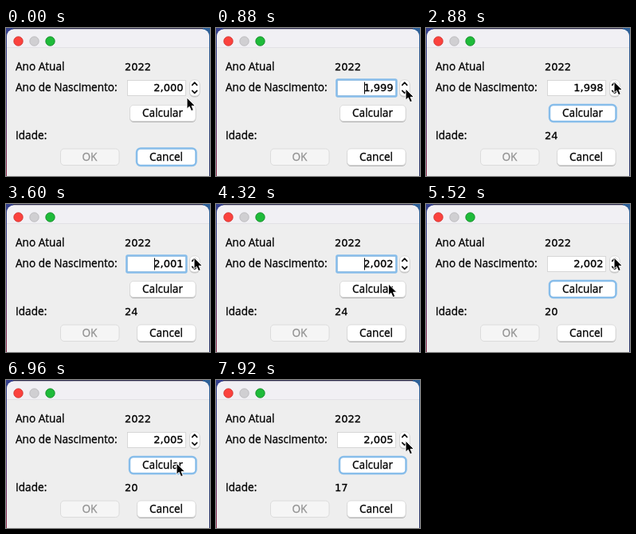
An HTML page that plays this animation: 256x185 px, repeating every 8000 ms.

```html
<!DOCTYPE html>
<html lang="pt">
<head>
<meta charset="utf-8">
<style>
html, body { margin: 0; width: 100%; height: 100%; overflow: hidden; background: #eee; }
svg { display: block; width: 256px; height: 185px; }
text { font: 13.6px "Open Sans", sans-serif; fill: #000; stroke: #000; stroke-width: .3px; }
.num { font: 13px "DejaVu Sans", sans-serif; }
.mid { text-anchor: middle; }
.off { fill: #929292; stroke: #929292; }
.btn { fill: #fff; stroke: #cfcfcf; stroke-width: .6; }
.ring { fill: none; stroke: #87bdea; stroke-width: 2.5; }
.arrow { fill: none; stroke: #111; stroke-width: 1.7; stroke-linecap: round; stroke-linejoin: round; }
</style>
</head>
<body>
<svg viewBox="0 0 256 185">
  <defs>
    <linearGradient id="left" x2="0" y2="1">
      <stop offset="0" stop-color="#34408c"/>
      <stop offset=".5" stop-color="#4a3580"/>
      <stop offset="1" stop-color="#922c50"/>
    </linearGradient>
    <linearGradient id="right" x2="0" y2="1">
      <stop offset="0" stop-color="#2d6098"/>
      <stop offset="1" stop-color="#2c3468"/>
    </linearGradient>
    <filter id="soft" x="-20%" y="-30%" width="140%" height="170%">
      <feDropShadow dx="0" dy=".8" stdDeviation=".7" flood-opacity=".35"/>
    </filter>
    <clipPath id="frame"><rect x="1" y="1.5" width="254" height="195" rx="9"/></clipPath>
  </defs>
  <rect width="128" height="185" fill="url(#left)"/>
  <rect x="128" width="128" height="185" fill="url(#right)"/>
  <rect x="9" width="238" height="2" fill="#292748"/>
  <g clip-path="url(#frame)">
    <rect width="256" height="185" fill="#eee"/>
    <rect width="256" height="24" fill="#f1f0f4"/>
    <path d="M0 24.5H256" stroke="#e2e1e5"/>
  </g>

  <g stroke-width=".9">
    <circle cx="15.5" cy="16.5" r="5.7" fill="#fb423e" stroke="#cf3531"/>
    <circle cx="35.5" cy="16.5" r="5.7" fill="#d0cfd2" stroke="#b9b8bb"/>
    <circle cx="55.5" cy="16.5" r="5.7" fill="#1fbb3a" stroke="#128a28"/>
  </g>

  <text x="12" y="53">Ano Atual</text>
  <text x="149" y="53" class="num">2022</text>
  <text x="12" y="79">Ano de Nascimento:</text>
  <text x="12" y="139">Idade:</text>
  <text id="age" x="149" y="139" class="num"></text>

  <rect x="152.5" y="65.5" width="73" height="19" fill="#fff" stroke="#d0d0d0" stroke-width=".8"/>
  <text id="year" x="222.5" y="79" class="num" text-anchor="end"></text>
  <path id="caret" d="M186.5 67.5V82.5" stroke="#000"/>

  <g filter="url(#soft)">
    <rect class="btn" x="230.5" y="65" width="12.5" height="20" rx="5"/>
    <rect class="btn" x="155.5" y="96.5" width="82.5" height="20" rx="4.5"/>
    <rect class="btn" x="164.5" y="151" width="73.5" height="20.5" rx="4.5"/>
  </g>
  <path class="arrow" d="M233.7 71.3L236.7 68.2L239.7 71.3M233.7 78.3L236.7 81.4L239.7 78.3"/>
  <rect x="68.5" y="151" width="73.5" height="20.5" rx="4.5" fill="#f5f5f5" stroke="#d6d6d6" stroke-width=".8"/>
  <text class="mid" x="196.5" y="110.5">Calcular</text>
  <text class="mid off" x="105" y="165.5">OK</text>
  <text class="mid" x="201" y="165.5">Cancel</text>

  <rect id="fieldRing" class="ring" x="151.4" y="64.4" width="75" height="21" rx="1.5"/>
  <rect id="calcRing" class="ring" x="155" y="96" width="83.5" height="21" rx="5"/>
  <rect id="cancelRing" class="ring" x="164" y="150.5" width="74.5" height="21.5" rx="5"/>

  <path id="pointer" d="M0 0V14.2L3.2 11.3L5.6 16.7L8.3 15.5L6 10.4H10.4Z"
        fill="#000" stroke="#fff" stroke-width="1" stroke-linejoin="round"/>
</svg>
<script>
const LOOP = 8000, STEP = 80, BLINK = 500, NOW = 2022;
const HOME = [227, 87], CALC = [214, 104], UP = [236, 67], DOWN = [238, 76];

// Each round: spin the year a few times, then press Calcular
const rounds = [
  { spin: 480, gap: 480, clicks: 2, dir: -1, press: 1920 },
  { spin: 3120, gap: 240, clicks: 4, dir: 1, press: 4640 },
  { spin: 5600, gap: 240, clicks: 3, dir: 1, press: 6960 },
];
const spot = r => r.dir > 0 ? UP : DOWN;

// Lists of [time, value], each value held until the next
const years = [[0, 2000]], ages = [[0, ""]], focus = [[0, "cancel"]];
const moves = [{ t: 80, span: 320, to: spot(rounds[0]) }];

let year = 2000;
rounds.forEach((r, i) => {
  for (let k = 0; k < r.clicks; k++) years.push([r.spin + k * r.gap, year += r.dir]);
  focus.push([r.spin, "field"], [r.press, "calc"]);
  ages.push([r.press + 160, NOW - year]);
  moves.push(
    { t: r.press - 640, span: 480, to: CALC },
    { t: r.press + 320, span: 320, to: spot(rounds[(i + 1) % rounds.length]) });
});

const el = id => document.getElementById(id);
const at = (list, t) => list.filter(e => e[0] <= t).pop();
const easeOut = u => 1 - (1 - u) ** 2;

function pointerAt(t) {
  let p = HOME;
  for (const m of moves) {
    const u = easeOut(Math.min(1, Math.max(0, (t - m.t) / m.span)));
    p = p.map((v, i) => v + (m.to[i] - v) * u);
  }
  return p;
}

function show(id, on) {
  el(id).setAttribute("visibility", on ? "visible" : "hidden");
}

function draw(ms) {
  const t = Math.floor(ms % LOOP / STEP) * STEP;
  const [changed, value] = at(years, t);
  const active = at(focus, t)[1];
  el("year").textContent = value.toLocaleString("en-US");
  el("age").textContent = at(ages, t)[1];
  for (const name of ["field", "calc", "cancel"]) show(name + "Ring", name === active);
  show("caret", active === "field" && Math.floor((t - changed) / BLINK) % 2 === 0);
  el("pointer").setAttribute("transform", `translate(${pointerAt(t)})`);
}

const start = performance.now();
function tick() {
  draw(performance.now() - start);
  requestAnimationFrame(tick);
}
tick();
</script>
</body>
</html>
```
